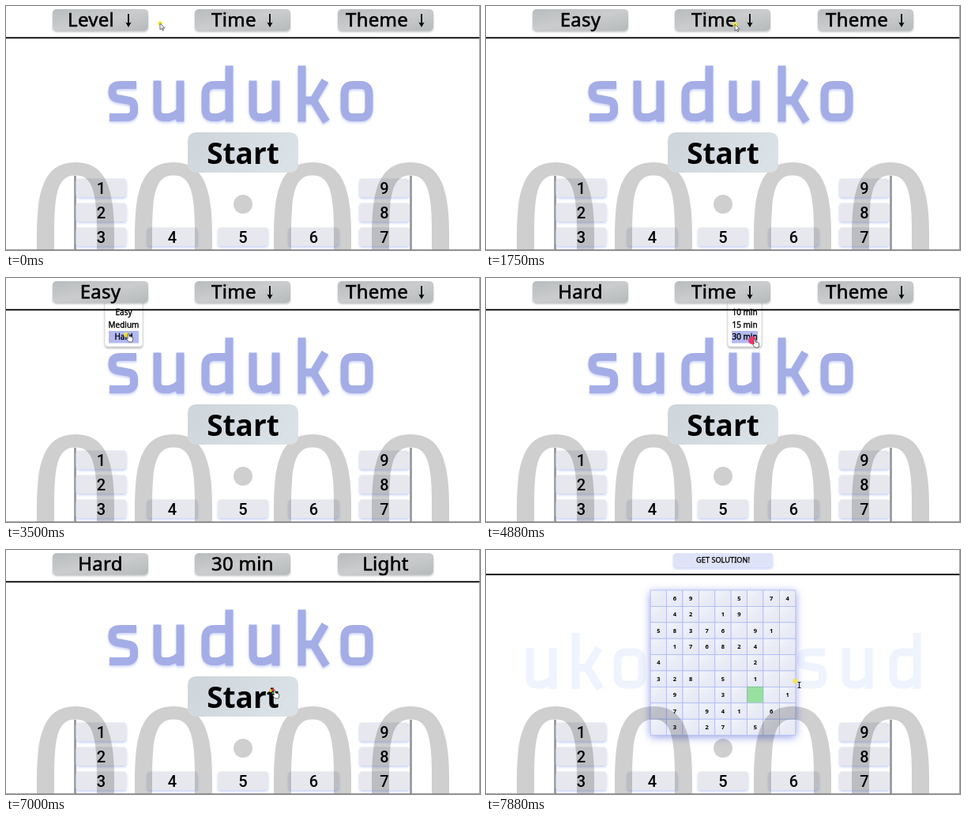
Write an HTML page that moves like this. It is 600 px wide and 309 px high and loops after 8 s.

```html
<!DOCTYPE html>
<html lang="en">
<head>
<meta charset="utf-8">
<title>suduko</title>
<style>
html, body { margin: 0; width: 100%; height: 100%; overflow: hidden; background: #fff; }
svg { display: block; width: 100%; height: 100%; }
text { font-family: "Noto Sans", "Open Sans", sans-serif; }
.label { font-size: 24px; letter-spacing: .3px; stroke: #000; stroke-width: .6px; }
.item { font-size: 10px; text-anchor: middle; stroke: #000; stroke-width: .35px; }
.solve { font-size: 9.2px; text-anchor: middle; stroke: #000; stroke-width: .3px; }
.key { font-family: Roboto, "Liberation Sans", sans-serif; font-size: 20px; font-weight: 500; text-anchor: middle; }
.cell { font-size: 7.5px; font-weight: 800; text-anchor: middle; }
.mid { text-anchor: middle; }
.letters { fill: none; stroke-width: 10; stroke-linejoin: round; }
</style>
</head>
<body>
<svg id="stage" viewBox="0 0 600 309" preserveAspectRatio="none">
  <defs>
    <linearGradient id="bar" x1="0" y1="0" x2="1" y2="1">
      <stop offset="0" stop-color="#b9bcbe"/><stop offset=".5" stop-color="#cacccd"/><stop offset="1" stop-color="#b7babc"/>
    </linearGradient>
    <linearGradient id="start" x1="0" y1="0" x2="1" y2=".3">
      <stop offset="0" stop-color="#cdd4da"/><stop offset="1" stop-color="#dae2e7"/>
    </linearGradient>
    <linearGradient id="tile" x1="0" y1="0" x2="1" y2="1">
      <stop offset="0" stop-color="#f4f5fc"/><stop offset=".5" stop-color="#e9ebf6"/><stop offset="1" stop-color="#e6e8f5"/>
    </linearGradient>
    <filter id="soft" x="-20%" y="-40%" width="140%" height="190%">
      <feDropShadow dx="0" dy="2" stdDeviation="1.3" flood-color="#777" flood-opacity=".45"/>
    </filter>
    <filter id="blue" x="-20%" y="-40%" width="140%" height="200%">
      <feDropShadow dx="0" dy="2" stdDeviation="1.5" flood-color="#9eaff5" flood-opacity=".55"/>
    </filter>
    <filter id="glow" x="-20%" y="-20%" width="140%" height="140%">
      <feDropShadow dx="0" dy="2" stdDeviation="5.5" flood-color="#7080e0" flood-opacity=".75"/>
    </filter>
  </defs>
  <rect width="600" height="309" fill="#fff"/>
  <g id="marquee"></g>
  <g id="keys"></g>
  <g id="game"></g>
  <g id="clock" fill-opacity=".19"></g>
  <g id="home"></g>
  <path d="M0 308.5H600M599.5 0V309" stroke="#8a8a8a" opacity=".8"/>
  <g id="pointer"></g>
</svg>
<script>
const $ = id => document.getElementById(id);
const show = (el, on) => el.setAttribute('display', on ? 'inline' : 'none');
const rect = (x, y, w, h, r, fill, more = '') =>
  `<rect x="${x}" y="${y}" width="${w}" height="${h}" rx="${r}" fill="${fill}" ${more}/>`;
const text = (x, y, str, cls, more = '') => `<text x="${x}" y="${y}" class="${cls}" ${more}>${str}</text>`;

// Square display lettering: x-height 0..52, ascender at -19
const glyphs = {
  s: 'M36 5.5H16Q5.5 5.5 5.5 13V15Q5.5 22 14 23L25 25Q33 26 33 33V38Q33 46.5 23 46.5H2',
  u: 'M5.5 0V37Q5.5 46.5 14 46.5H20Q28 45 34.5 39M34.5 0V52',
  d: 'M35.5 -19V52M35.5 5.5H17Q5.5 5.5 5.5 17V36Q5.5 46.5 15 46.5H21Q29 45 35.5 39',
  k: 'M5.5 -19V52M5.5 25H20L35 0M20 25L36.5 52',
  o: 'M16 5.5H26Q36.5 5.5 36.5 17V35Q36.5 46.5 26 46.5H16Q5.5 46.5 5.5 35V17Q5.5 5.5 16 5.5Z'
};
const lettering = (word, xs, y) =>
  [...word].map((c, i) => `<path transform="translate(${xs[i]} ${y})" d="${glyphs[c]}"/>`).join('');

// Clock digits, a translucent layer over keypad and board
const zero = x => {
  const ring = (l, r, top, a, b) => {
    const m = (l + r) / 2;
    return `M${l} 330V290C${l} ${a} ${l + b} ${top} ${m} ${top}S${r} ${a} ${r} 290V330Z`;
  };
  return `<path fill-rule="evenodd" d="${ring(x + 1, x + 99, 198, 230, 11)}${ring(x + 23, x + 77, 214.5, 236, 5)}"/>`;
};
$('clock').innerHTML = [38, 162, 338, 462].map(zero).join('') + '<circle cx="300" cy="251" r="12"/>';

const keyAt = n => n < 4 ? [120.5, 199.5 + 31 * n] : n < 7 ? [300 + 89.5 * (n - 5), 292.5] : [479, 292.5 - 31 * (n - 7)];
$('keys').innerHTML = '<path d="M87.5 215V309M512.5 215V309" stroke="#929296" stroke-width="2.6"/>' +
  [1, 2, 3, 4, 5, 6, 7, 8, 9].map(n => {
    const [x, y] = keyAt(n);
    return rect(x - 32, y - 12, 64, 23.5, 4, '#e6e8ee', 'filter="url(#blue)"') + text(x, y + 7.7, n, 'key');
  }).join('');

// Start screen
const menus = [
  { x: 59, textX: 78, arrow: 155, name: 'Level', drop: 125, w: 48, items: ['Easy', 'Medium', 'Hard'] },
  { x: 239, textX: 260, arrow: 334, name: 'Time', drop: 306, w: 43, items: ['10 min', '15 min', '30 min'] },
  { x: 420, textX: 430, arrow: 526, name: 'Theme', drop: 488, w: 42, items: ['Light', 'Dark'] }
];
const dropdown = (m, k) => `<g id="drop${k}">` +
  rect(m.drop, 28, m.w, 12 + 15.7 * m.items.length, 4, '#fff', 'filter="url(#soft)" stroke="#c9c9c9" stroke-width=".6"') +
  rect(m.drop + 5, 0, m.w - 10, 15.5, 0, '#b3baf0', `id="pick${k}"`) +
  m.items.map((s, i) => text(m.drop + m.w / 2, 46.8 + 15.7 * i, s, 'item')).join('') + '</g>';
const button = (m, k) => rect(m.x, 4, 121, 27, 5, 'url(#bar)', 'filter="url(#soft)"') +
  `<g id="name${k}">${text(m.textX, 26, m.name, 'label')}` +
  `<path d="M${m.arrow} 10V24" stroke="#000" stroke-width="1.8"/>` +
  `<path d="M${m.arrow - 3.6} 20.5L${m.arrow} 27L${m.arrow + 3.6} 20.5L${m.arrow} 22Z"/></g>` +
  text(m.x + 60.5, 26, '', 'label mid', `id="value${k}"`);
$('home').innerHTML =
  `<g class="letters" stroke="#a4ade6" filter="url(#blue)" role="img" aria-label="suduko">${lettering('suduko', [129, 186, 247, 307, 369, 423], 94.5)}</g>` +
  rect(230, 160, 140, 51, 10, 'url(#start)') +
  text(300, 200, 'Start', 'mid', 'font-size="37" font-weight="700"') +
  menus.map(dropdown).join('') + rect(0, 39.4, 600, 1.8, 0, '#000') + menus.map(button).join('');

// Puzzle screen
const rows = ['.69..5.74', '.42.19...', '58376.91.', '.176824..', '4.....2..', '328.5.1..', '.9..3...1', '.7.941.6.', '.3.27.5..'];
const size = 20.4;
const tile = (c, i, j) => {
  const x = 208.2 + size * i, y = 51 + size * j, green = i === 6 && j === 6;
  return rect(x, y, size, size, 0, green ? '#97e0a0' : 'url(#tile)',
    green ? 'stroke="#68b87a" stroke-width=".9" stroke-dasharray="2 1"' : 'stroke="#aeb9f3" stroke-width=".8"') +
    (c === '.' ? '' : text(x + size / 2, y + 12.8, c, 'cell'));
};
$('marquee').innerHTML = `<g class="letters" stroke="#eff3fd">${lettering('ukosud', [50, 108, 161, 393, 450, 510], 124)}</g>`;
$('game').innerHTML = rect(0, 30, 600, 2, 0, '#000') +
  rect(237, 4, 126, 18, 4, '#dee3f8', 'filter="url(#blue)"') +
  text(300, 16.4, 'GET SOLUTION!', 'solve') +
  rect(208, 51, 184, 184, 0, '#fff', 'filter="url(#glow)"') +
  rows.map((r, j) => [...r].map((c, i) => tile(c, i, j)).join('')).join('');

// Pointer
$('pointer').innerHTML = '<circle id="spot" r="3" fill="#f5e83c" opacity=".9"/><circle id="press" r="5" fill="#ee3768"/>' +
  '<g id="burst"><circle cx="-2" cy="-1" r="2" fill="#f1d02f"/><circle cx="1" cy="-2" r="1.8" fill="#e4304f"/><circle cx="1" cy="2" r="1.6" fill="#49a457"/></g>' +
  '<path id="arrow" d="M0 0V8L2 6.3L3.4 9.2L4.7 8.6L3.3 5.8H6Z" fill="#fff" stroke="#444" stroke-width=".8"/>' +
  '<path id="hand" transform="translate(1 1)" d="M1 -2Q2.2 -3 3 -2V1L7 2Q8 2.4 7.7 5L6.8 8H2.5L-.3 4.4Q0 3 1.2 4Z" fill="#fff" stroke="#444" stroke-width=".8"/>' +
  '<path id="beam" d="M3.5 1.5H7.5M5.5 1.5V8.5M3.5 8.5H7.5" stroke="#222" stroke-width="1" fill="none"/>';

const TICK = 125, LOOP = 8000;
const track = [ // tick, x, y, shape
  [0, 195, 22, 'arrow'], [4, 162, 14, 'hand'], [6, 162, 14, 'hand'], [8, 158, 41, 'hand'], [9, 158, 41, 'arrow'],
  [12, 345, 24, 'arrow'], [19, 194, 21, 'arrow'], [21, 162, 11, 'hand'], [23, 162, 12, 'hand'], [26, 153, 62, 'hand'],
  [28, 152, 72, 'hand'], [30, 152, 72, 'arrow'], [33, 338, 16, 'hand'], [35, 338, 16, 'hand'], [38, 337, 76, 'hand'],
  [39, 337, 79, 'hand'], [40, 345, 74, 'arrow'], [44, 518, 15, 'hand'], [46, 518, 15, 'hand'], [48, 508, 42, 'hand'],
  [50, 506, 43, 'arrow'], [54, 345, 150, 'arrow'], [55, 345, 150, 'arrow'], [56, 337, 179, 'hand'], [57, 337, 179, 'hand'],
  [62, 388, 164, 'arrow'], [63, 391, 166, 'beam']
];
// Menu index, opening and closing ticks
const opened = [[0, 6, 10], [0, 23, 31], [1, 35, 41], [2, 46, 51]];
// Menu index, tick, chosen value
const chosen = [[0, 9, 'Easy'], [0, 30, 'Hard'], [1, 40, '30 min'], [2, 50, 'Light']];
const presses = [8, 29, 39, 49];

function pointerAt(n) {
  let k = track.length - 1;
  while (track[k][0] > n) k--;
  const a = track[k], b = track[k + 1] || a;
  const u = b === a ? 0 : (n - a[0]) / (b[0] - a[0]), e = u * u * (3 - 2 * u);
  return { x: a[1] + (b[1] - a[1]) * e, y: a[2] + (b[2] - a[2]) * e, shape: a[3] };
}

function draw(ms) {
  const n = Math.floor((ms % LOOP) / TICK), playing = n >= 63, p = pointerAt(n);
  show($('home'), !playing);
  show($('game'), playing);
  show($('marquee'), playing);
  menus.forEach((m, k) => {
    show($('drop' + k), opened.some(([i, from, to]) => i === k && n >= from && n < to));
    const row = Math.round((p.y - 43) / 15.7);
    show($('pick' + k), row >= 0 && row < m.items.length);
    $('pick' + k).setAttribute('y', 35.6 + 15.7 * row);
    const pick = chosen.filter(([i, at]) => i === k && n >= at).pop();
    show($('name' + k), !pick);
    $('value' + k).textContent = pick ? pick[2] : '';
  });
  $('pointer').setAttribute('transform', `translate(${p.x} ${p.y})`);
  for (const s of ['arrow', 'hand', 'beam']) show($(s), s === p.shape);
  const pressed = presses.includes(n), burst = n === 56;
  show($('spot'), !pressed && !burst);
  show($('press'), pressed);
  show($('burst'), burst);
}

const begin = performance.now();
function frame(now) {
  draw(Math.max(0, now - begin));
  requestAnimationFrame(frame);
}
draw(0);
requestAnimationFrame(frame);
</script>
</body>
</html>
```
